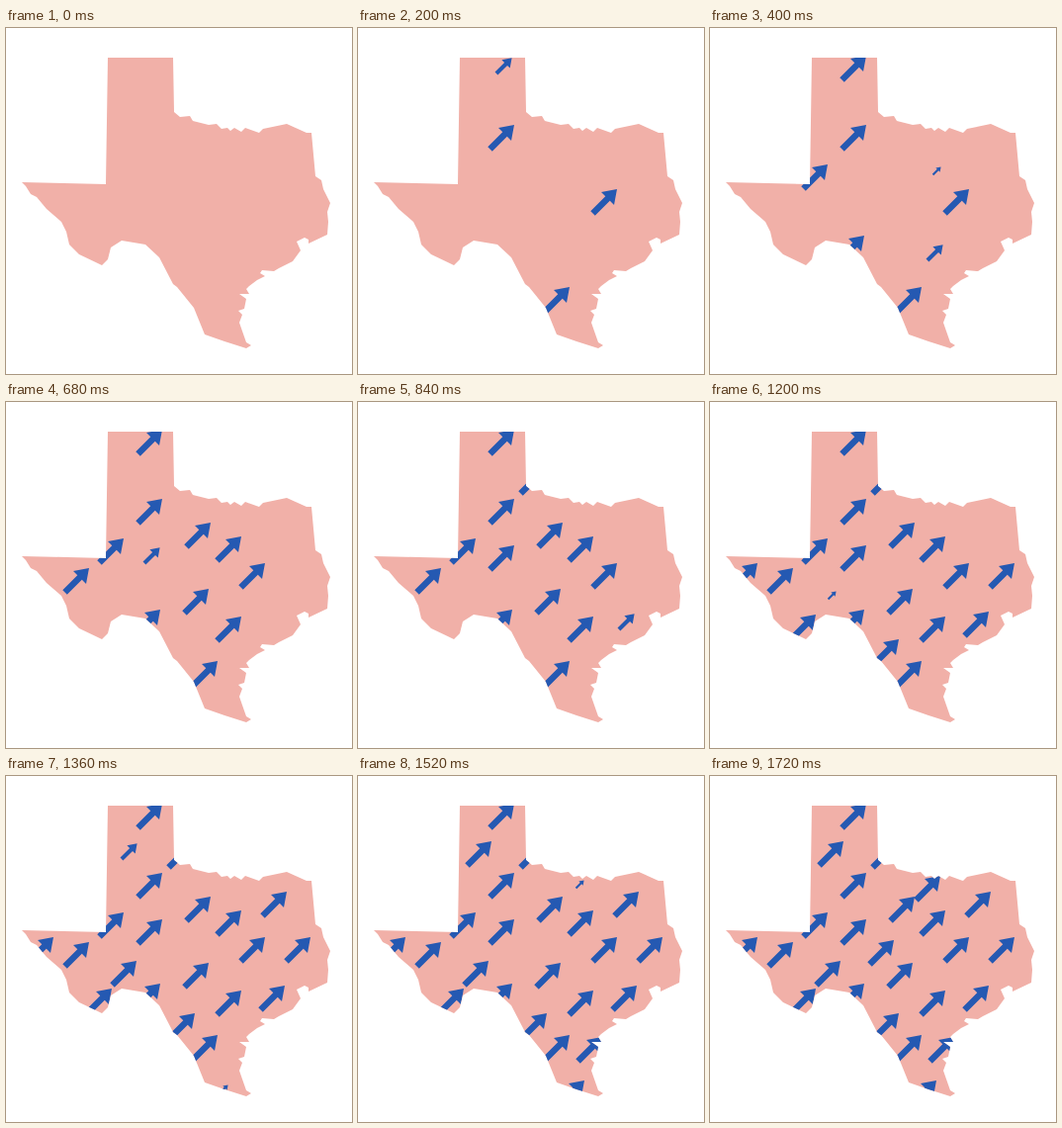
These frames come from a looping animation (350x350 px, 2440 ms). An HTML page:

```html
<!DOCTYPE html>
<html lang="en">
<head>
<meta charset="utf-8">
<title>Arrows across Texas</title>
<style>
  html, body { margin: 0; width: 100%; height: 100%; overflow: hidden; background: #fff; }
  svg { display: block; width: 100%; height: 100%; }
</style>
</head>
<body>
<svg viewBox="0 0 350 350">
  <defs>
    <clipPath id="border"><use href="#state"/></clipPath>
  </defs>
  <path id="state" fill="#f1b0a8" d="M103 30 169 30 170 85 176 90 186 89 189 94 205 98 213 97 218 102 224 101
    227 104 231 101 238 105 242 101 256 106 260 102 284 97 304 106 309 106
    313 150 319 154 321 163 328 177 325 186 326 196 325 209 306 218 306 214 302 212 294 216
    298 225 290 236 276 243 271 246 259 245 257 248 262 251 254 255 246 261
    243 264 246 269 236 269 243 274 241 284 235 286 239 290 236 298 243 318 248 321 243 324
    221 317 201 310 190 283 173 262 169 259 155 232 141 219 117 215 106 222 103 234 97 240
    74 229 64 219 61 206 56 196 41 183 31 171 25 168 20 160 16 156 101 158Z"/>
  <g id="arrows" fill="#2559b2" clip-path="url(#border)"></g>
</svg>
<script>
const LOOP = 2440, STEP = 40;
const GROWTH = [0.33, 0.64, 1];
const PIVOT = 9.3; // distance behind the tip that stays put while growing
const SHAPE = 'M0 0L-13.4-9.2V-3.2H-34.6V3.2H-13.4V9.2Z';

// tip x, tip y, step at which the arrow appears
const ARROWS = [
  [214, 262, 1], [158, 98, 2], [262, 163, 3], [158, 28, 4], [119, 138, 6],
  [156, 210, 7], [238, 217, 9], [238, 136, 10], [205, 189, 12], [207, 122, 13],
  [84, 168, 15], [158, 145, 16], [189, 68, 18], [282, 212, 20], [107, 215, 22],
  [191, 240, 25], [308, 163, 27], [48, 163, 28], [132, 187, 30], [284, 117, 31],
  [135, 66, 33], [229, 308, 34], [247, 264, 36], [233, 101, 38], [186, 166, 41]
];

const layer = document.getElementById('arrows');
const arrows = ARROWS.map(([x, y, start]) => {
  const node = document.createElementNS('http://www.w3.org/2000/svg', 'path');
  node.setAttribute('d', SHAPE);
  layer.append(node);
  return { node, x, y, start };
});

function draw() {
  const step = Math.floor((performance.now() % LOOP) / STEP);
  for (const { node, x, y, start } of arrows) {
    const age = step - start;
    const scale = age < 0 ? 0 : GROWTH[Math.min(age, GROWTH.length - 1)];
    node.style.display = scale ? '' : 'none';
    node.setAttribute('transform',
      `translate(${x} ${y}) rotate(-45) translate(${-PIVOT * (1 - scale)} 0) scale(${scale})`);
  }
  requestAnimationFrame(draw);
}
draw();
</script>
</body>
</html>
```
